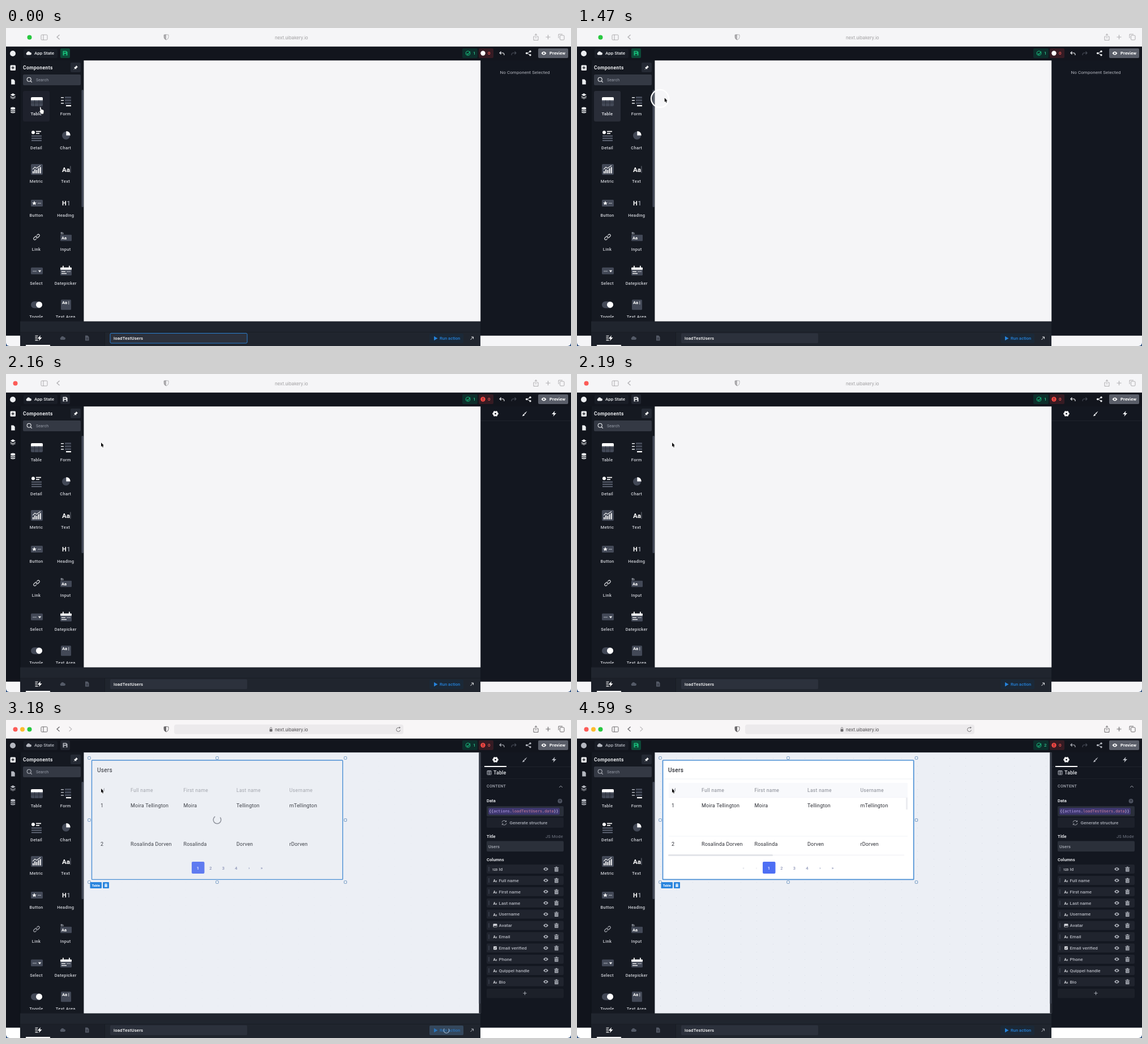
An HTML page with a canvas that plays this animation: 998x561 px, repeating every 4620 ms.

```html
<!DOCTYPE html>
<html lang="en">
<head>
<meta charset="utf-8">
<title>App builder</title>
<style>
html, body { margin: 0; width: 100%; height: 100%; overflow: hidden; background: #13161e; }
canvas { display: block; }
</style>
</head>
<body>
<canvas width="998" height="561"></canvas>
<script>
const ctx = document.querySelector('canvas').getContext('2d');
const LOOP = 4620, WHITE = '#fff', GRAY = '#434957', LIGHT = '#d9dbe0', DIM = '#a6aab3', BLUE = '#2a85de';

// Times of the hard changes
const CARET = 210, PRESS = 780, DRAG = 1080, ARRIVE = 1600, ZONE = 1530, DROP = 1830,
      TABS = 2070, SELECT = 2460, LOADED = 3450, SAVED = 4230;

// Ink of the secondary icons and labels, set for every frame
let soft = LIGHT;

const ICONS = {
  cloud: 'M-3 3A2.3 2.3 0 0 1-3-1.2A3 3 0 0 1 2.6-1.4A2.2 2.2 0 0 1 3 3Z',
  file: 'M-3-4.5H1L3.5-2V4.5H-3Z',
  layers: 'M0-4.5L4.5-2L0 .5L-4.5-2ZM-4.5 .2L0 2.7L4.5 .2V1.4L0 4L-4.5 1.4ZM-4.5 2.6L0 5L4.5 2.6V3.4L0 5.6L-4.5 3.4Z',
  data: 'M-4-3.5A4 1.6 0 0 1 4-3.5V-2A4 1.6 0 0 1-4-2ZM-4-.8A4 1.6 0 0 0 4-.8V1A4 1.6 0 0 1-4 1ZM-4 2.2A4 1.6 0 0 0 4 2.2V4A4 1.6 0 0 1-4 4Z',
  floppy: 'M-4-4H2L4-2V4H-4Z',
  pin: 'M1-4L4-1L2.6-.6L1 1.2L.6 3L-1 1.5L-4 4L-1.6 .9L-3-.6L-1.2-1L.6-2.6Z',
  eye: 'M-4.5 0Q0-6 4.5 0Q0 6-4.5 0ZM1.5 0A1.5 1.5 0 1 0-1.5 0A1.5 1.5 0 1 0 1.5 0Z',
  trash: 'M-4-3H-1.5V-4.2H1.5V-3H4V-2H-4ZM-3.2-1.4H3.2V4.4H-3.2ZM-1.4 0V3H-.8V0ZM.8 0V3H1.4V0Z',
  bolt: 'M1.5-5L-4 1H-.6L-1.5 5L4-1H.6Z',
  brush: 'M4.5-4.5L-.8-.4L.8 1.2ZM-1.4 .2L.2 1.8Q0 4.4-4.4 4.2Q-3 3-2.8 1.4Z',
  star: 'M0-4L1.1-1.2L4-1.2L1.7 .6L2.6 3.4L0 1.7L-2.6 3.4L-1.7 .6L-4-1.2L-1.1-1.2Z',
  undo: 'M-1.5-3.5L-4-1L-1.5 1.5M-4-1H1.5Q4-1 4 3',
  redo: 'M1.5-3.5L4-1L1.5 1.5M4-1H-1.5Q-4-1-4 3',
  plus: 'M-4 0H4M0-4V4',
  check: 'M-2 0L-.4 1.6L4-3.4',
  refresh: 'M-4-.6A4 4 0 0 1 3.4-2M3.6-4V-1.8H1.4M4 .6A4 4 0 0 1-3.4 2M-3.6 4V1.8H-1.4',
  arrow: 'M0 0V7.2L1.6 5.8L2.8 8.4L4 7.8L2.9 5.3H5Z',
  hand: 'M0 1Q0-.6 1.3 0L2.2 4L5.6 5Q7 5.6 6.7 8L6 12H2.2L-.6 8Q-1.4 6.4 .6 7.2Z'
};

function rect(x, y, w, h, fill, r = 0, stroke, line = 1) {
  ctx.beginPath();
  ctx.roundRect(x, y, w, h, r);
  if (fill) { ctx.fillStyle = fill; ctx.fill(); }
  if (stroke) { ctx.strokeStyle = stroke; ctx.lineWidth = line; ctx.stroke(); }
}

function disc(x, y, r, fill, stroke, line = 1, from = 0, to = 7) {
  ctx.beginPath();
  ctx.arc(x, y, r, from, to);
  if (fill) { ctx.fillStyle = fill; ctx.fill(); }
  if (stroke) { ctx.strokeStyle = stroke; ctx.lineWidth = line; ctx.stroke(); }
}

// Draws a path around (x, y): filled, or stroked when a line width is given
function icon(path, x, y, color, line) {
  const shape = new Path2D(ICONS[path] || path);
  ctx.save();
  ctx.translate(x, y);
  if (line) {
    ctx.strokeStyle = color;
    ctx.lineWidth = line;
    ctx.stroke(shape);
  } else {
    ctx.fillStyle = color;
    ctx.fill(shape, 'evenodd');
  }
  ctx.restore();
}

// y is the vertical middle of the capitals
function text(s, x, y, size, color, { weight = 400, gap = 0.12, align = 'left', font = 'Roboto, sans-serif' } = {}) {
  ctx.font = `${weight} ${size}px ${font}`;
  ctx.letterSpacing = gap + 'px';
  ctx.textAlign = align;
  ctx.fillStyle = color;
  ctx.fillText(s, x, y + size * 0.36);
}

function browserBar(t, full) {
  rect(0, 0, 998, 32.5, full ? '#f8f6f7' : '#f5f5f7');
  const early = t < ZONE;
  if (full || !early) disc(16.5, 16.5, 4, '#fc5b57');
  if (full) disc(29, 16.5, 4, '#fdbc2e');
  if (full || early) disc(41.5, 16.5, 4, '#28c840');
  if (full) rect(297, 8, 405, 17, '#eceaec', 4);
  ctx.globalAlpha = full ? 1 : 0.5;
  const ink = '#6c6a6d';
  rect(62, 12, 11, 9, null, 1.5, ink);
  icon('M-2-4.5V4.5', 68, 16.5, ink, 1);
  icon('M2.5-4L-2 0L2.5 4', 92, 16, ink, 1.3);
  if (full) icon('M-2.5-4L2 0L-2.5 4', 114, 16, '#bdbbbd', 1.1);
  icon('M0-4.5Q2 -4 4-4V0Q4 3.5 0 5Q-4 3.5-4 0V-4Q-2-4 0-4.5Z', 283, 16, ink, 0.9);
  icon('M0-4.5V5Q-4 3.5-4 0V-4Z', 283, 16, ink);
  if (full) {
    rect(465.5, 16, 5, 4.5, ink, 1);
    icon('M-1.5 0V-2A1.5 1.5 0 0 1 1.5-2V0', 468, 16.5, ink, 0.8);
    disc(693, 17, 3.4, null, ink, 0.9, 0.2, 5.2);
    icon('M0-2L3-1L.8 1.2Z', 694, 14, ink);
  }
  text('next.uibakery.io', 475, 17, 7.8, '#4b494c', { gap: 0, font: 'Inter, sans-serif' });
  icon('M-2-1.5H-4V5H4V-1.5H2M0 2V-6M-2.3-3.8L0-6L2.3-3.8', 936, 16.5, ink, 1);
  icon('plus', 957.5, 16, ink, 1.1);
  rect(978.5, 13, 7.5, 8, null, 1.5, ink);
  icon('M-5 2V-5H2', 981, 16, ink, 1);
  ctx.globalAlpha = 1;
}

function topBar(t) {
  const saved = t < 1950 || t >= SAVED;
  disc(12, 45, 5, soft);
  rect(31, 37, 60, 16, '#191d26', 2);
  icon('cloud', 40, 44.5, soft);
  text('App State', 50, 44.5, 8, soft, { weight: 500, gap: 0 });
  const back = saved ? '#0d4a38' : '#222630';
  rect(96, 36, 17, 17, back, 2);
  icon('floppy', 104.5, 44.5, saved ? '#19c27d' : soft);
  rect(102, 42, 4, 1.6, back);
  rect(102.5, 45.5, 4, 3, back);

  rect(806, 36, 27, 17, '#0d2e2b', 2);
  disc(816, 44.5, 3.8, null, '#19b97c', 1.1);
  icon('check', 816, 45, '#19b97c', 1.1);
  text(t < LOADED ? '1' : '2', 825, 44.5, 8, '#30bd88', { weight: 500 });
  rect(835, 36, 26, 17, '#361b23', 2);
  const early = t < ZONE;
  disc(842.5, 44.5, 4.2, early ? WHITE : '#ef4642');
  if (!early) icon('M0-2.4V.6M0 1.4V2.6', 842.5, 44.5, '#361b23', 1);
  text('0', 851, 44.5, 8, '#ef5a56', { weight: 500 });

  icon('undo', 876, 45, soft, 1.2);
  icon('redo', 897, 45, '#4a4f5a', 1.1);
  icon('M3-3L-3 0L3 3', 923, 44.5, soft, 1);
  for (const [x, y] of [[926, 41.2], [919.6, 44.5], [926, 47.8]]) disc(x, y, 1.7, soft);
  rect(940, 36, 53, 17, '#5a5e69', 2);
  icon('eye', 950, 44.5, WHITE);
  text('Preview', 960, 44.5, 7.5, WHITE, { weight: 700, gap: 0.2 });
}

const components = [
  ['Table', (x, y) => {
    rect(x - 10, y - 8, 21, 16, GRAY, 2);
    rect(x - 10, y - 8, 21, 5.5, WHITE, [2, 2, 0, 0]);
    icon('M-10 2H11M-3.5-2.5V8M4-2.5V8', x, y, '#232731', 0.8);
  }],
  ['Form', (x, y) => {
    for (let i = 0; i < 3; i++) {
      rect(x - 9, y - 8 + i * 5, 5, 1.5, soft);
      rect(x - 2, y - 9 + i * 5, 11, 3.2, GRAY, 0.5);
    }
    rect(x, y + 6, 9, 2.2, WHITE);
  }],
  ['Detail', (x, y) => {
    disc(x - 6, y - 5.5, 3, WHITE);
    rect(x - 1, y - 8, 9, 1.7, WHITE);
    rect(x - 1, y - 4.5, 6, 1.7, WHITE);
    for (let i = 0; i < 3; i++) rect(x - 9, y + i * 4, 18, 1.7, '#697080');
  }],
  ['Chart', (x, y) => {
    disc(x, y, 7, GRAY);
    icon('M0 0V-7.5A7.5 7.5 0 0 1 7.5 0Z', x + 0.3, y - 0.3, WHITE);
  }],
  ['Metric', (x, y) => {
    rect(x - 10, y - 9.5, 21, 19, GRAY, 2);
    [4, 7, 6, 9, 11].forEach((h, i) => rect(x - 7 + i * 3.2, y + 7 - h, 1.9, h, WHITE));
    icon('M-7 0L-3-4L0-2L7-7', x, y, WHITE, 1.1);
  }],
  ['Text', (x, y) => {
    text('Aa', x - 7, y, 11.5, WHITE, { weight: 700, gap: 0 });
    rect(x + 7.5, y - 6, 0.8, 12, '#858a95');
  }],
  ['Button', (x, y) => {
    rect(x - 10, y - 6, 21, 12, GRAY, 1.5);
    icon('star', x - 4, y, WHITE);
    rect(x + 2, y - 0.5, 6, 1.2, '#a1a6b0');
  }],
  ['Heading', (x, y) => {
    text('H', x - 7, y, 11, WHITE, { weight: 700, gap: 0 });
    text('1', x + 1.5, y, 11, '#a3a8b2', { weight: 500, gap: 0 });
  }],
  ['Link', (x, y) => {
    icon('M-.5 2.2L-2 3.8A2.2 2.2 0 0 1-5 .8L-2-2A2.2 2.2 0 0 1 1-1', x, y + 0.8, soft, 1.1);
    icon('M.5-2.2L2-3.8A2.2 2.2 0 0 1 5-.8L2 2A2.2 2.2 0 0 1-1 1', x, y - 0.8, soft, 1.1);
  }],
  ['Input', (x, y) => {
    text('Bb', x - 9.5, y - 6.3, 4.5, '#a1a6b0', { weight: 700, gap: 0 });
    rect(x - 10, y - 4, 20, 11, GRAY, 1);
    text('Aa', x - 8, y + 1.2, 7.5, WHITE, { weight: 700, gap: 0 });
  }],
  ['Select', (x, y) => {
    rect(x - 10, y - 6, 21, 12, GRAY, 1.5);
    rect(x - 7, y, 7, 1.1, '#a1a6b0');
    icon('M-2.6-1.6H2.6L0 2Z', x + 5.5, y + 0.5, WHITE);
  }],
  ['Datepicker', (x, y) => {
    rect(x - 10, y - 6, 20, 14, GRAY, 1.5);
    rect(x - 10, y - 6, 20, 4, WHITE, 1);
    rect(x - 6, y - 9, 1.8, 4, WHITE);
    rect(x + 5, y - 9, 1.8, 4, WHITE);
    rect(x - 8, y + 0.5, 7, 1.3, WHITE);
    rect(x + 1, y + 0.5, 7, 1.3, '#a1a6b0');
    rect(x - 8, y + 4, 9, 1.3, WHITE);
  }],
  ['Toggle', (x, y) => {
    rect(x - 10, y - 6, 20, 12, GRAY, 6);
    disc(x + 4.5, y, 5.5, WHITE);
  }],
  ['Text Area', (x, y) => {
    rect(x - 9, y - 9, 18, 18, GRAY, 1.5);
    text('Aa', x - 7, y - 3.5, 7.5, WHITE, { weight: 700, gap: 0 });
    rect(x + 4.5, y - 6.5, 0.7, 6, WHITE);
  }]
];

function leftPanel(t) {
  rect(0, 57, 25, 485.5, '#11141c');
  rect(25, 57, 113, 461, '#151921');
  rect(24.5, 57, 1, 485.5, '#0d1016');
  rect(7.5, 65.5, 9.5, 9.5, '#f0f1f3', 1.5);
  icon('M-2.6 0H2.6M0-2.6V2.6', 12.2, 70.2, '#11141c', 1.2);
  ['file', 'layers', 'data'].forEach((name, i) => icon(name, 12.2, 95 + i * 24.8, soft));

  text('Components', 30, 70, 8.5, '#eceef1', { weight: 700, gap: 0.4 });
  rect(114, 61, 18, 17, '#252a34', 2);
  icon('pin', 123, 70, WHITE);
  rect(30, 82, 102, 19, '#343944', 2);
  disc(40.7, 90.8, 3.5, null, soft, 1.1);
  icon('M0 0L2.6 2.6', 43.2, 93.3, soft, 1.1);
  text('Search', 53, 91.3, 7, '#999eaa');

  if (t < DROP) rect(30, 111, 47, 54, t < PRESS ? '#1e212c' : '#292d38', 3);
  ctx.save();
  ctx.beginPath();
  ctx.rect(25, 105, 112, 406);
  ctx.clip();
  components.forEach(([name, draw], i) => {
    const right = i % 2, y = Math.floor(i / 2) * 59.7;
    draw(54 + right * 52, 130 + y);
    text(name, 53.5 + right * 51.7, 151.3 + y, 7.5, '#d2d4da',
      { weight: i || t >= DROP ? 500 : 700, gap: 0.3, align: 'center' });
  });
  ctx.restore();
  rect(133.5, 109, 3.5, 207, '#434957', 1.5);
}

function bottomBar(t) {
  rect(25, 517.5, 813, 43.5, '#20252e');
  rect(25, 536, 813, 1, '#191d25');
  rect(25, 537, 149, 24, '#1c2029');
  rect(174, 537, 1, 24, '#171b22');
  icon('M-5-4H0M-5-1.5H-1M-5 1H-1M-5 3.8H0', 56.5, 547, WHITE, 1.2);
  icon('bolt', 59.5, 547, WHITE);
  icon('cloud', 100, 547, '#545a67');
  icon('file', 143, 547, '#545a67');
  icon('M-1.5 0H2M-1.5 2H2', 143, 547, '#1c2029', 0.8);
  rect(35, 559, 43, 2, WHITE);

  rect(184, 538.5, 242, 17.5, '#2c313c', 2, t < PRESS ? '#2a7fd0' : null);
  text('loadTestUsers', 190, 547, 7.7, WHITE, { weight: 500, gap: 0.2 });
  if (t >= CARET && t < PRESS) rect(242.5, 543, 1, 9, WHITE);

  const running = t >= SELECT && t < LOADED;
  rect(748, 539, 60, 17, running ? '#34475c' : '#1b2938', 2);
  ctx.globalAlpha = running ? 0.75 : 1;
  icon('M-3-3.8L3.5 0L-3 3.8Z', 759, 547.5, '#2583dc');
  text('Run action', 766, 547.3, 7.4, '#2583dc', { weight: 500, gap: 0.1 });
  ctx.globalAlpha = 1;
  if (running) disc(778, 547.5, 4.8, null, '#8fabc8', 1.2, t / 130, t / 130 + 4.5);
  icon('M-2.5 2.5L2.5-2.5M-1-2.5H2.5V1', 823, 547.5, soft, 1);
}

const columns = ['Id', 'Full name', 'First name', 'Last name', 'Username', 'Avatar',
  'Email', 'Email verified', 'Phone', 'Quippel handle', 'Bio'];

function columnRow(name, i) {
  const y = 263 + i * 19.88;
  rect(849, y - 8, 136, 16, '#20242e', 2);
  icon('M0-4V4', 853, y, '#4b515e', 1);
  if (name === 'Avatar') {
    rect(860.5, y - 3, 7, 6, LIGHT, 1);
    icon('M-3 2L-1-.5L.5 1L2-1L3 2Z', 864, y + 0.5, '#20242e');
  } else if (name === 'Email verified') {
    rect(861, y - 3, 6, 6, LIGHT, 1);
    icon('M-1.8 0L-.4 1.3L1.9-1.3', 864, y, '#20242e', 0.9);
  } else {
    text(i ? 'A' : '123', i ? 860.5 : 859, y + 0.8, i ? 6.5 : 5.3, LIGHT, { weight: 700, gap: 0 });
    if (i) text('z', 865, y + 1.4, 4.5, LIGHT, { weight: 700 });
  }
  text(name, 870.5, y, 8, '#b3b6bf', { weight: 500, gap: 0.05 });
  icon('eye', 953.5, y, DIM);
  icon('trash', 972.3, y, DIM);
}

function rightPanel(t) {
  rect(838, 57, 160, 485.5, '#131720');
  if (t < TABS) {
    text('No Component Selected', 916.5, 78.5, 8, '#b4b7bf', { gap: 0.08, align: 'center' });
    return;
  }
  for (let i = 0; i < 6; i++) disc(864.5 + 3.3 * Math.cos(i * 1.047), 70 + 3.3 * Math.sin(i * 1.047), 2, WHITE);
  disc(864.5, 70, 3.6, WHITE);
  disc(864.5, 70, 1.5, '#131720');
  icon('brush', 916, 70, soft);
  icon('bolt', 968, 70, soft);
  rect(838, 82, 160, 1, '#20242d');
  if (t < SELECT) return;

  rect(845, 81, 39, 2, WHITE);
  rect(850, 89.5, 7, 7, null, 0.5, DIM);
  icon('M-3.5-2.2H3.5M-3.5 .8H3.5M0-2V3.5', 853.5, 93, DIM, 1);
  text('Table', 861, 93, 9, '#e4e6ea', { weight: 500, gap: 0.15 });
  rect(838, 103, 160, 1, '#1d212a');
  text('CONTENT', 849, 116.3, 7, '#a6aab4', { weight: 500, gap: 0.35 });
  icon('M-2.8 1.5L0-1.3L2.8 1.5', 980, 117.5, DIM, 1);
  const label = { weight: 700, gap: 0.05 };
  text('Data', 849, 142.5, 7.6, '#e4e6ea', label);
  disc(978.5, 143, 4, '#4d525f');
  text('?', 976.9, 143, 6, '#131720', label);

  rect(849, 152, 136, 18, '#292e39', 2);
  rect(852, 155, 126, 12, '#3e376f', 2);
  const mono = { font: '"DejaVu Sans Mono", monospace', gap: 0 };
  let x = 853;
  for (const [part, color] of [['{{', '#d8cff5'], ['actions', '#b9a2ee'], ['.', '#d8cff5'],
    ['loadTestUsers', '#d0849f'], ['.', '#d8cff5'], ['data', '#d0849f'], ['}}', '#d8cff5']]) {
    text(part, x, 161, 6.8, color, mono);
    x += ctx.measureText(part).width;
  }
  rect(849, 172, 136, 18, '#1d212b', 2);
  icon('refresh', 880, 181.3, DIM, 0.9);
  text('Generate structure', 889.5, 181.3, 8, '#a9adb7', { weight: 500, gap: 0 });
  text('Title', 849, 205.3, 7.6, '#e4e6ea', label);
  text('JS Mode', 953, 205.3, 7.5, '#747986', { gap: 0.2 });
  rect(849, 213.5, 136, 18.5, '#2b303a', 2);
  text('Users', 852, 223, 7.6, '#a6aab4', { weight: 500 });
  text('Columns', 849, 246.3, 7.6, '#e4e6ea', label);
  columns.forEach(columnRow);
  rect(849, 474, 136, 16.5, '#1c2029', 2);
  icon('M-3.2 0H3.2M0-3.2V3.2', 916.5, 482, DIM, 1);
}

function workspace(t) {
  const zone = t >= ZONE && t < DROP, selected = t >= SELECT;
  rect(137.4, 57.3, 700.8, 460.2, zone ? '#eeeff4' : selected ? '#eceff5' : '#f5f5f7');
  if (zone) rect(146.5, 66.5, 454.5, 218.5, '#bbd7f3');
  if (zone || selected) {
    ctx.fillStyle = `rgba(110,120,150,${zone ? 0.26 : t < LOADED ? 0.04 : 0.14})`;
    for (let x = 146.8; x < 830; x += 28.4)
      for (let y = 67; y < 505; y += 13.67) ctx.fillRect(Math.round(x), Math.round(y), 1, 1);
  }
  if (zone) {
    ctx.setLineDash([2.5, 1.5]);
    rect(146.5, 66.5, 454.5, 218.5, null, 0, '#4f93dd');
    ctx.setLineDash([]);
  }
  if (!selected) return;
  rect(835.5, 57.3, 2.7, 460.2, '#1d212a');
  rect(835.5, 57.3, 2.7, 443, '#343a46');
  dataTable(t);
}

const cols = [167, 220, 313.5, 407, 500.5];
const people = [
  ['1', 'Moira Tellington', 'Moira', 'Tellington', 'mTellington'],
  ['2', 'Rosalinda Dorven', 'Rosalinda', 'Dorven', 'rDorven']
];

function dataTable(t) {
  const loading = t < LOADED;
  rect(151.5, 71, 443.2, 210.4, loading ? '#eceff4' : WHITE, 1, '#4b8fd4', loading ? 1.4 : 1.7);
  if (!loading) {
    rect(153, 103.5, 440, 1, '#f0f2f5');
    rect(162, 111, 422, 25, '#f8f9fc');
    rect(162, 136, 422, 1, '#f3f4f8');
    rect(162, 204.5, 422, 1, '#f2f4f7');
    rect(581, 137, 3, 21, '#ebecf0', 1);
    rect(346, 237, 232, 3, '#f8f8fa');
    rect(161, 237, 185, 3, '#e2e4e9', 1.5);
  }
  text('Users', 161, 88.5, 10, '#2c2e35', { weight: loading ? 400 : 500, gap: 0.3 });
  ['Id', 'Full name', 'First name', 'Last name', 'Username'].forEach((s, i) =>
    text(s, cols[i], 124.3, 8.5, loading ? '#a3a6ad' : '#9b9ea6', { weight: loading ? 400 : 500, gap: 0.33 }));
  people.forEach((row, r) => row.forEach((s, i) =>
    text(s, cols[i], 150.8 + r * 68, 9, loading ? '#3f4249' : '#2b2d34', { gap: 0.17 })));

  rect(328, 250, 22.5, 21, loading ? '#5f7bf0' : '#4e6ff4', 2);
  [['«', 294], ['‹', 317], ['1', 339], ['2', 361.5], ['3', 384], ['4', 406.5], ['›', 429.5], ['»', 451.5]]
    .forEach(([s, x], i) => {
      if (loading && i < 2) return;
      const color = i < 2 ? '#d4d7df' : i === 2 ? WHITE : '#6f78a4';
      text(s, x, 261.2, 7.5, color, { align: 'center', weight: i === 2 ? 500 : 400 });
    });
  if (loading) disc(373, 176, 6.8, null, '#8f939c', 1.5, t / 130, t / 130 + 4.8);

  for (const x of [147, 373, 599.5])
    for (const y of [67, 176.5, 286])
      if (x !== 373 || y !== 176.5) rect(x - 2.2, y - 2.2, 4.4, 4.4, WHITE, 0.5, '#5b86b8', 0.9);
  rect(148.5, 286, 20.5, 11, BLUE, 1);
  text('Table', 158.8, 291.7, 5.6, WHITE, { weight: 700, align: 'center' });
  rect(171, 286, 11, 11, BLUE, 1);
  ctx.save();
  ctx.translate(176.5, 291.5);
  ctx.scale(0.7, 0.7);
  icon('trash', 0, 0, WHITE);
  ctx.restore();
}

function pointerAt(t) {
  const u = Math.min(1, Math.max(0, (t - DRAG) / (ARRIVE - DRAG)));
  const e = u < 0.5 ? 2 * u * u : 1 - 2 * (1 - u) ** 2;
  return [60 + 108 * e, 139.5 - 18.5 * e];
}

function pointer(t) {
  const [x, y] = pointerAt(t);
  if (t >= PRESS && t < DROP) {
    const [rx, ry] = pointerAt(t - 30);
    disc(rx - 1.3, ry, 15.5, 'rgba(255,255,255,.12)', t < ZONE ? WHITE : '#f0f3f8', 2.2);
  }
  const hand = t < DRAG, shape = hand ? 'hand' : 'arrow';
  icon(shape, x, y, hand ? '#15181f' : WHITE, 1.4);
  icon(shape, x, y, hand ? WHITE : '#0b0b0d');
}

function draw(now) {
  const t = now % LOOP;
  const full = t >= ZONE && t < 1950 || t >= 2400;
  soft = full ? '#b4b7bf' : '#eceef1';
  rect(0, 0, 998, 561, '#2b4f82');
  rect(0, 0, 998, 561, full ? WHITE : '#f5f5f7', [0, 0, 6, 6]);
  rect(0, 32.5, 998, 510, '#12151d');
  browserBar(t, full);
  topBar(t);
  leftPanel(t);
  rightPanel(t);
  bottomBar(t);
  workspace(t);
  pointer(t);
  requestAnimationFrame(tick);
}

const start = performance.now();
function tick() { draw(Math.max(0, performance.now() - start)); }
tick();
</script>
</body>
</html>
```
